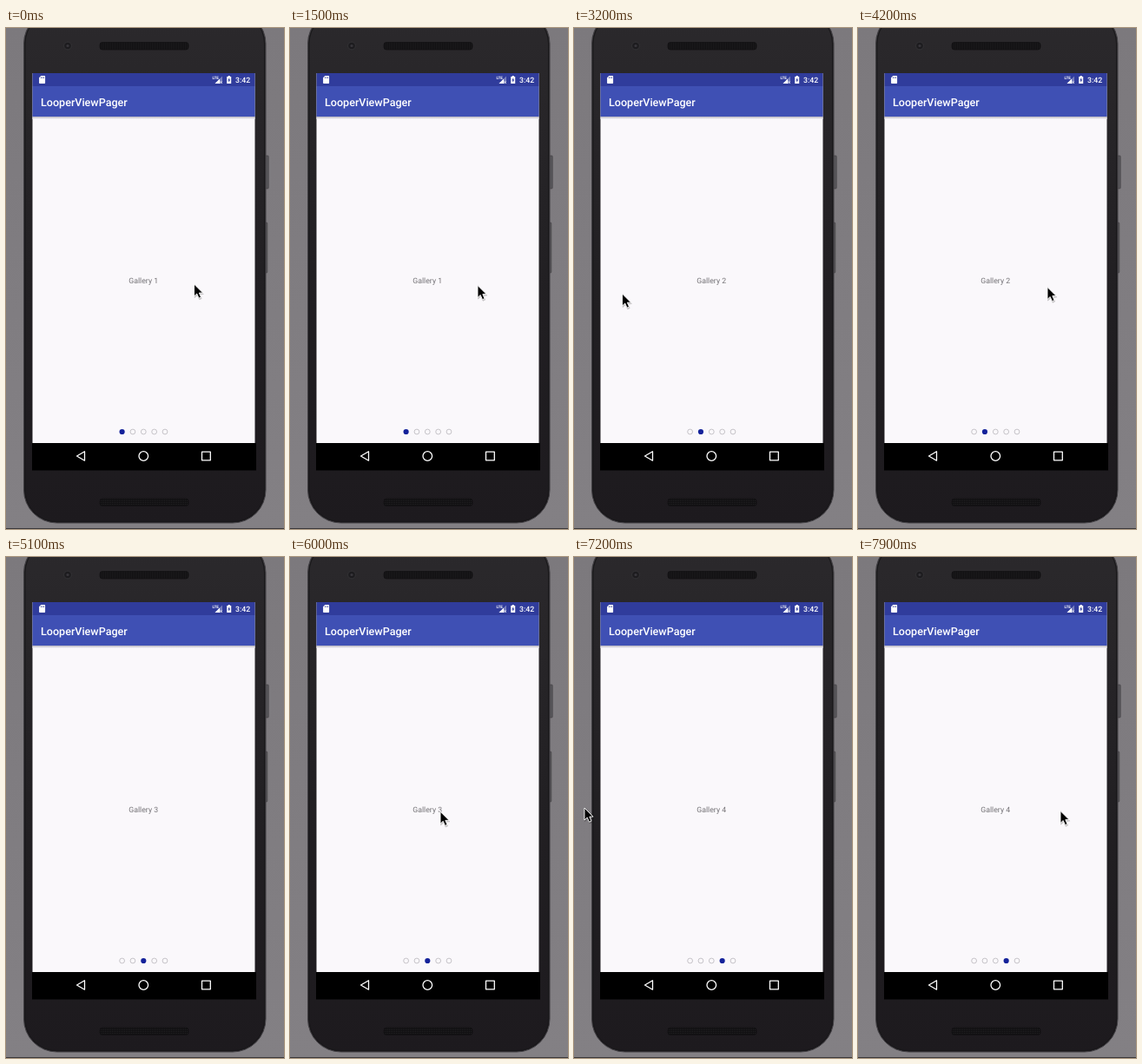
Animation of 320 by 577 pixels, one loop 8000 ms. Source, as an HTML page:

```html
<!DOCTYPE html>
<html lang="en">
<head>
<meta charset="utf-8">
<title>LooperViewPager</title>
<style>
  html, body { margin: 0; width: 100%; height: 100%; overflow: hidden; background: #7f7c80; }
  svg { display: block; }
  text { font-family: Roboto, sans-serif; text-rendering: geometricPrecision; }
</style>
</head>
<body>
<svg width="320" height="577" viewBox="0 0 320 577">
  <defs>
    <linearGradient id="back" x2="0" y2="1">
      <stop stop-color="#7c797d"/><stop offset="1" stop-color="#838084"/>
    </linearGradient>
    <linearGradient id="shell" x2="0" y2="1">
      <stop stop-color="#2b292c"/><stop offset=".5" stop-color="#222023"/><stop offset="1" stop-color="#1d1a1e"/>
    </linearGradient>
    <linearGradient id="shade" x2="0" y2="1">
      <stop stop-color="#b4b2bd"/><stop offset="1" stop-color="#faf8fb"/>
    </linearGradient>
    <pattern id="mesh" width="2" height="2" patternUnits="userSpaceOnUse">
      <rect width="2" height="2" fill="#111012"/><rect width="1" height="1" fill="#222123"/>
    </pattern>
    <rect id="speaker" x="108" width="102" height="8.5" rx="3" fill="url(#mesh)" stroke="#121113" stroke-width=".8"/>
    <path id="arrow" d="M0 0v14l3.200-3 2.300 5.200 2.500-1.100-2.200-5h4.300z"/>
  </defs>

  <rect width="320" height="577" fill="url(#back)"/>
  <rect y="576" width="320" height="1" fill="#39373a"/>

  <!-- phone -->
  <g fill="#58565a" stroke="#403e42" stroke-width=".6">
    <rect x="298" y="147" width="4.200" height="38" rx="1"/>
    <rect x="298" y="224" width="2.800" height="58" rx="1"/>
  </g>
  <rect x="20.500" y="-20" width="278.500" height="590" rx="38" fill="url(#shell)" stroke="#434145"/>
  <rect x="22" y="-18.500" width="275.500" height="587" rx="36.500" fill="none" stroke="#19181a"/>
  <circle cx="71" cy="20.500" r="4.400" fill="#1d1c1f" stroke="#343336"/>
  <circle cx="71" cy="20.500" r="1.600" fill="#38363b"/>
  <use href="#speaker" y="16.500"/>
  <use href="#speaker" y="542"/>

  <!-- screen -->
  <g transform="translate(30.500 0)">
    <rect y="52" width="256" height="457" fill="#faf8fb"/>
    <rect y="52" width="256" height="15" fill="#303c9c"/>
    <rect y="67" width="256" height="35" fill="#3f50b4"/>
    <rect y="102" width="256" height="3" fill="url(#shade)"/>
  </g>
  <rect x="30" y="478" width="258" height="31.500" fill="#000"/>

  <!-- status bar and title -->
  <g fill="#fff">
    <path d="M40.300 55h4a.8.8 0 0 1 .8.8v7.400a.8.8 0 0 1-.8.8h-5.400a.8.8 0 0 1-.8-.8v-5.900z"/>
    <path d="M40.300 56.300v1.800M42 56.300v1.800M43.600 56.300v1.800" stroke="#303c9c" stroke-width=".7"/>
    <path d="M249 55.500v8.500h-8.500z" fill-opacity=".35"/>
    <path d="M246 58.500v5.500h-5.500z"/>
    <path d="M246.300 61.300l2.400 2.400m0-2.400l-2.400 2.400" stroke="#fff" stroke-width=".8"/>
    <text x="237.500" y="58.600" font-size="4.600" font-weight="700">LTE</text>
    <path d="M255.700 55h2v.9h1.500v8.100h-5v-8.100h1.500z"/>
    <path d="M257.200 57l-1.900 3.400h1.100v2.300l1.900-3.300h-1.100z" fill="#303c9c"/>
    <text x="264" y="62.900" font-size="8.730" font-weight="500">3:42</text>
    <text x="40" y="89.600" font-size="12.550" font-weight="500">LooperViewPager</text>
  </g>

  <!-- pages -->
  <svg x="30.500" y="105" width="256" height="340">
    <g id="pages" fill="#747276" font-size="8.730" text-anchor="middle"></g>
  </svg>
  <g id="dots"></g>

  <!-- navigation bar -->
  <g fill="none" stroke="#fff" stroke-width="1.300" stroke-linejoin="round">
    <path d="M81.500 493l9-5.200v10.400z"/>
    <circle cx="158.300" cy="493" r="5.300"/>
    <rect x="225.500" y="488.200" width="9.800" height="9.600"/>
  </g>

  <g id="cursor">
    <use href="#arrow" x=".6" y="1.500" stroke="#000" opacity=".2"/>
    <use href="#arrow" stroke="#fff" stroke-width=".9"/>
  </g>
</svg>
<script>
const LOOP = 8000, STEP = 100, PAGE = 257, COUNT = 5, SLOP = 8, SETTLE = 500;
const HOME = { x: 216.5, y: 295 };
const $ = id => document.getElementById(id);

// Pointer moves; those with a release time drag the pager
const moves = [
  { start: 0, end: 800, x: 170, y: 300 },
  { start: 1000, end: 1300, x: 216, y: 296.5 },
  { start: 1500, end: 2500, x: 46, y: 306.5, release: 2300 },
  { start: 3100, end: 3800, x: 218, y: 298.5 },
  { start: 4200, end: 4900, x: 22, y: 300, release: 4600 },
  { start: 5400, end: 6200, x: 201, y: 292 },
  { start: 6300, end: 6800, x: 12, y: 289, release: 6600 },
  { start: 7200, end: 7900, x: 233, y: 292.5 }
];
const swipes = moves.filter(move => move.release);

const clamp = v => Math.min(1, Math.max(0, v));
const ease = p => p * p * (3 - 2 * p);

function pointer(time) {
  let { x, y } = HOME;
  for (const move of moves) {
    const p = ease(clamp((time - move.start) / (move.end - move.start)));
    x += (move.x - x) * p;
    y += (move.y - y) * p;
  }
  return { x, y };
}

// Follows the pointer until release, then glides to the next page
function swipeOffset({ start, release }, time) {
  if (time < start) return 0;
  const dragged = Math.max(0, pointer(start).x - pointer(Math.min(time, release)).x - SLOP);
  if (time <= release) return dragged;
  return PAGE - (PAGE - dragged) * (1 - clamp((time - release) / SETTLE)) ** 2;
}

function add(parent, tag, attributes, text = "") {
  const node = document.createElementNS("http://www.w3.org/2000/svg", tag);
  for (const name in attributes) node.setAttribute(name, attributes[name]);
  node.textContent = text;
  return parent.appendChild(node);
}

const dots = [];
for (let i = 0; i < COUNT; i++) {
  add($("pages"), "text", { x: 127.7 + i * PAGE, y: 188.6 }, `Gallery ${i + 1}`);
  dots.push(add($("dots"), "circle", { cx: 133.6 + i * 12.35, cy: 465, "stroke-width": .8 }));
}

function draw(now) {
  const time = Math.floor(now % LOOP / STEP) * STEP;
  const offset = swipes.reduce((sum, swipe) => sum + swipeOffset(swipe, time), 0);
  const selected = swipes.filter(swipe => time > swipe.release).length;
  $("pages").setAttribute("transform", `translate(${-offset} 0)`);
  dots.forEach((dot, i) => {
    const on = i === selected;
    dot.setAttribute("r", on ? 3.1 : 2.9);
    dot.setAttribute("fill", on ? "#14229a" : "none");
    dot.setAttribute("stroke", on ? "none" : "#b9b7bc");
  });
  const { x, y } = pointer(time);
  const away = time >= 5000 && time < 5600;
  $("cursor").setAttribute("transform", `translate(${x} ${y})`);
  $("cursor").setAttribute("visibility", away ? "hidden" : "visible");
}

function tick() {
  draw(performance.now());
  requestAnimationFrame(tick);
}
tick();
</script>
</body>
</html>
```
